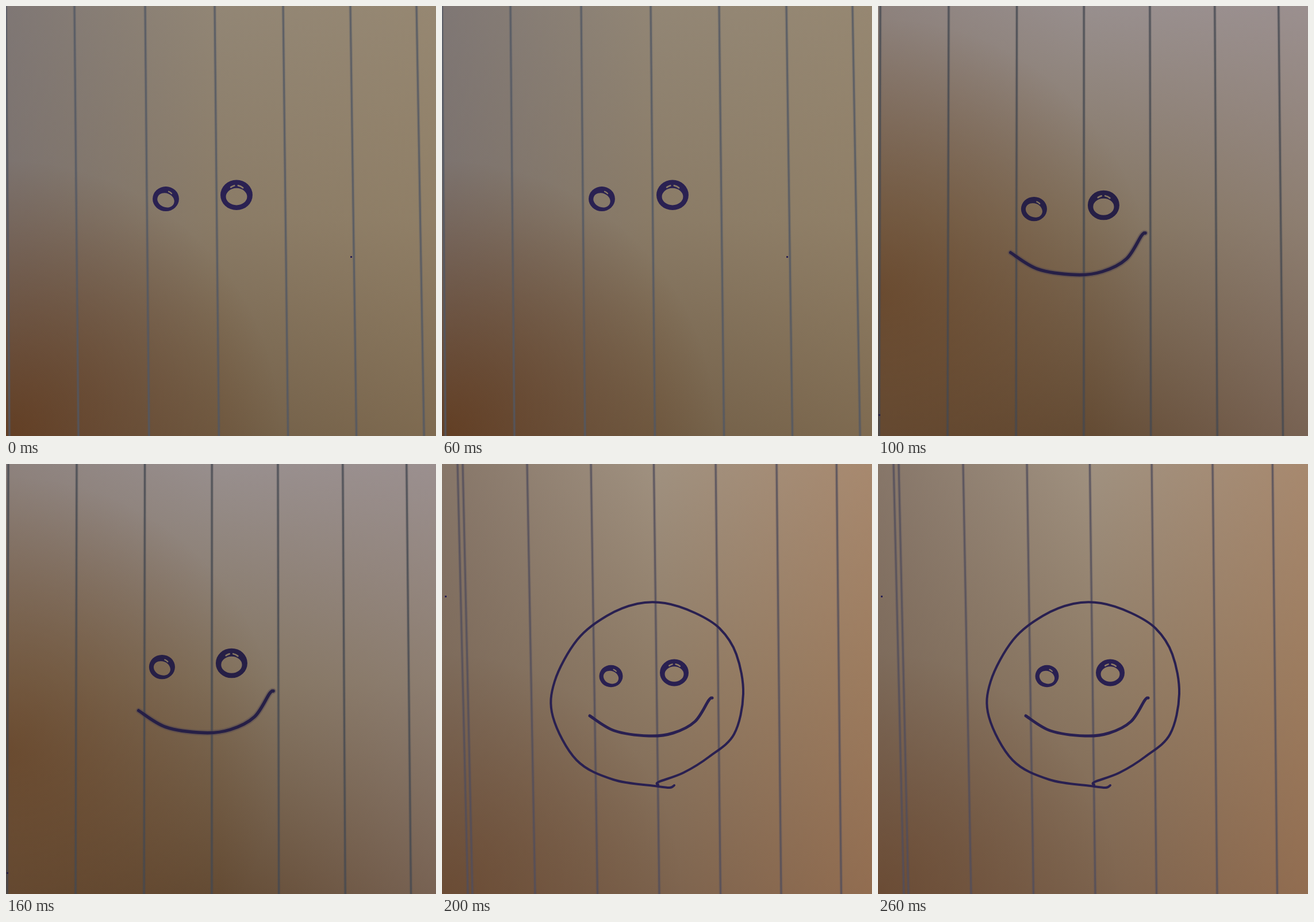
An HTML page with a canvas for the animation above (0.3 s loop, 748x748 px).

```html
<!DOCTYPE html>
<html lang="en">
<head>
<meta charset="utf-8">
<style>
  html, body { margin: 0; width: 100%; height: 100%; overflow: hidden; }
  canvas { display: block; width: 100vw; height: 100vh; }
</style>
</head>
<body>
<canvas width="748" height="748"></canvas>
<script>
const SIZE = 748, STEP = 100;
const ctx = document.querySelector('canvas').getContext('2d');

// One face, seen by a hand-held camera: each pose shifts and scales it.
// rules: first x, gap and shrink of the gap, at the top and at the bottom
const poses = [
  {
    paper: ['#928675', '#8a7b66', '#725f48'], left: '#6c687480', right: '#a08a6844',
    shade: { y: 748, r: 480, alpha: .75 },
    rules: { top: [119, 124, 1], bottom: [126, 123.5, .65], count: 6 },
    margins: [[0, 6]], ruleInk: '#525763', ink: '#2a2152',
    face: { x: -50.7, y: -77, scale: 1.118 }, speck: [599, 435]
  },
  {
    paper: ['#988f8e', '#847561', '#644c35'], left: '#6d5a4a40', right: '#a0909055',
    shade: { y: 500, r: 480, alpha: .5 },
    rules: { top: [123, 119.5, .95], bottom: [121, 119.7, .6], count: 6 },
    margins: [[4, 2]], ruleInk: '#444850', ink: '#261f46', halo: true,
    face: { x: -52, y: -52.8, scale: 1.1 }, speck: [1, 710]
  },
  {
    paper: ['#a09180', '#8e7b65', '#7c634e'], left: '#66544c70', right: '#b27c5466',
    shade: { y: 748, r: 420, alpha: .4 },
    rules: { top: [148, 111.9, .85], bottom: [162, 109, .5], count: 6 },
    margins: [[27, 45], [36, 53]], ruleInk: '#524e5b', ink: '#292051',
    face: { x: 0, y: 0, scale: 1 }, speck: [5, 229]
  }
];

const mouth = [[257, 438], [300, 464], [360, 473], [402, 468], [440, 448], [464, 411], [470, 407]];
const head = [
  [404, 559], [396, 563], [370, 560], [298, 549], [234, 515], [193, 440], [196, 378], [235, 306],
  [287, 264], [340, 243], [388, 242], [440, 259], [483, 286], [512, 331], [524, 400], [508, 470],
  [465, 509], [420, 537], [377, 553], [376, 558]
];

function fillGradient(gradient, stops) {
  stops.forEach(([at, colour]) => gradient.addColorStop(at, colour));
  ctx.fillStyle = gradient;
  ctx.fillRect(0, 0, SIZE, SIZE);
}

function drawPaper({ paper, left, right, shade }) {
  const clear = colour => colour.slice(0, 7) + '00';
  fillGradient(ctx.createLinearGradient(0, 0, 0, SIZE), paper.map((c, i) => [i / 2, c]));
  fillGradient(ctx.createLinearGradient(0, 0, SIZE, 0),
    [[0, left], [.5, clear(left)], [.5, clear(right)], [1, right]]);
  fillGradient(ctx.createRadialGradient(0, shade.y, 0, 0, shade.y, shade.r),
    [[0, `rgba(94, 50, 16, ${shade.alpha})`], [1, 'rgba(94, 50, 16, 0)']]);
}

function drawRules({ rules, margins, ruleInk }) {
  const place = ([first, gap, shrink], i) => first + gap * i - shrink * i * i;
  const lines = Array.from({ length: rules.count }, (_, i) => [place(rules.top, i), place(rules.bottom, i)]);
  ctx.strokeStyle = ruleInk;
  for (const [top, bottom] of [...margins, ...lines]) {
    ctx.beginPath();
    ctx.moveTo(top, 0);
    ctx.lineTo(bottom, SIZE);
    for (const [width, alpha] of [[5.5, .25], [2.8, .75]]) {
      ctx.lineWidth = width;
      ctx.globalAlpha = alpha;
      ctx.stroke();
    }
  }
  ctx.globalAlpha = 1;
}

function strokeInk({ ink, halo }, width) {
  if (halo) {
    ctx.strokeStyle = '#4b435066';
    ctx.lineWidth = width + 4;
    ctx.stroke();
  }
  ctx.strokeStyle = ink;
  ctx.lineWidth = width;
  ctx.stroke();
}

// Smooth curve through every point
function drawCurve(points, width, pose) {
  const at = i => points[Math.max(0, Math.min(points.length - 1, i))];
  ctx.beginPath();
  ctx.moveTo(...at(0));
  for (let i = 0; i < points.length - 1; i++) {
    const [a, b, c, d] = [at(i - 1), at(i), at(i + 1), at(i + 2)];
    ctx.bezierCurveTo(
      b[0] + (c[0] - a[0]) / 6, b[1] + (c[1] - a[1]) / 6,
      c[0] - (d[0] - b[0]) / 6, c[1] - (d[1] - b[1]) / 6, ...c);
  }
  strokeInk(pose, width);
}

// A thick ring with an off-centre hole and thin gaps above it
function drawEye(x, y, r, tilt, gaps, pose) {
  ctx.beginPath();
  ctx.ellipse(x, y, r, r * .94, 0, 0, 2 * Math.PI);
  ctx.moveTo(x, y);
  ctx.closePath();
  const holeY = y + r * .1;
  ctx.moveTo(x + r * .66 * Math.cos(tilt), holeY + r * .66 * Math.sin(tilt));
  ctx.ellipse(x, holeY, r * .66, r * .53, tilt, 0, 2 * Math.PI);
  ctx.fillStyle = pose.ink;
  ctx.fill('evenodd');
  ctx.strokeStyle = pose.paper[1];
  ctx.lineWidth = r * .1;
  for (const [from, to] of gaps) {
    ctx.beginPath();
    ctx.arc(x, y, r * .6, from, to);
    ctx.stroke();
  }
}

function draw(stage) {
  const pose = poses[stage], { face } = pose;
  drawPaper(pose);
  drawRules(pose);
  ctx.fillStyle = pose.ink;
  ctx.fillRect(...pose.speck, 3, 3);

  ctx.save();
  ctx.translate(face.x, face.y);
  ctx.scale(face.scale, face.scale);
  ctx.lineCap = ctx.lineJoin = 'round';
  drawEye(294, 369, 20.5, .4, [[-1.2, -.75]], pose);
  drawEye(404, 363, 25, 0, [[-2.2, -1.8], [-1.4, -.85]], pose);
  if (stage > 0) drawCurve(mouth, 5, pose);
  if (stage > 1) drawCurve(head, 4, pose);
  ctx.restore();
}

function tick() {
  draw(Math.floor(performance.now() / STEP) % poses.length);
  requestAnimationFrame(tick);
}
tick();
</script>
</body>
</html>
```
